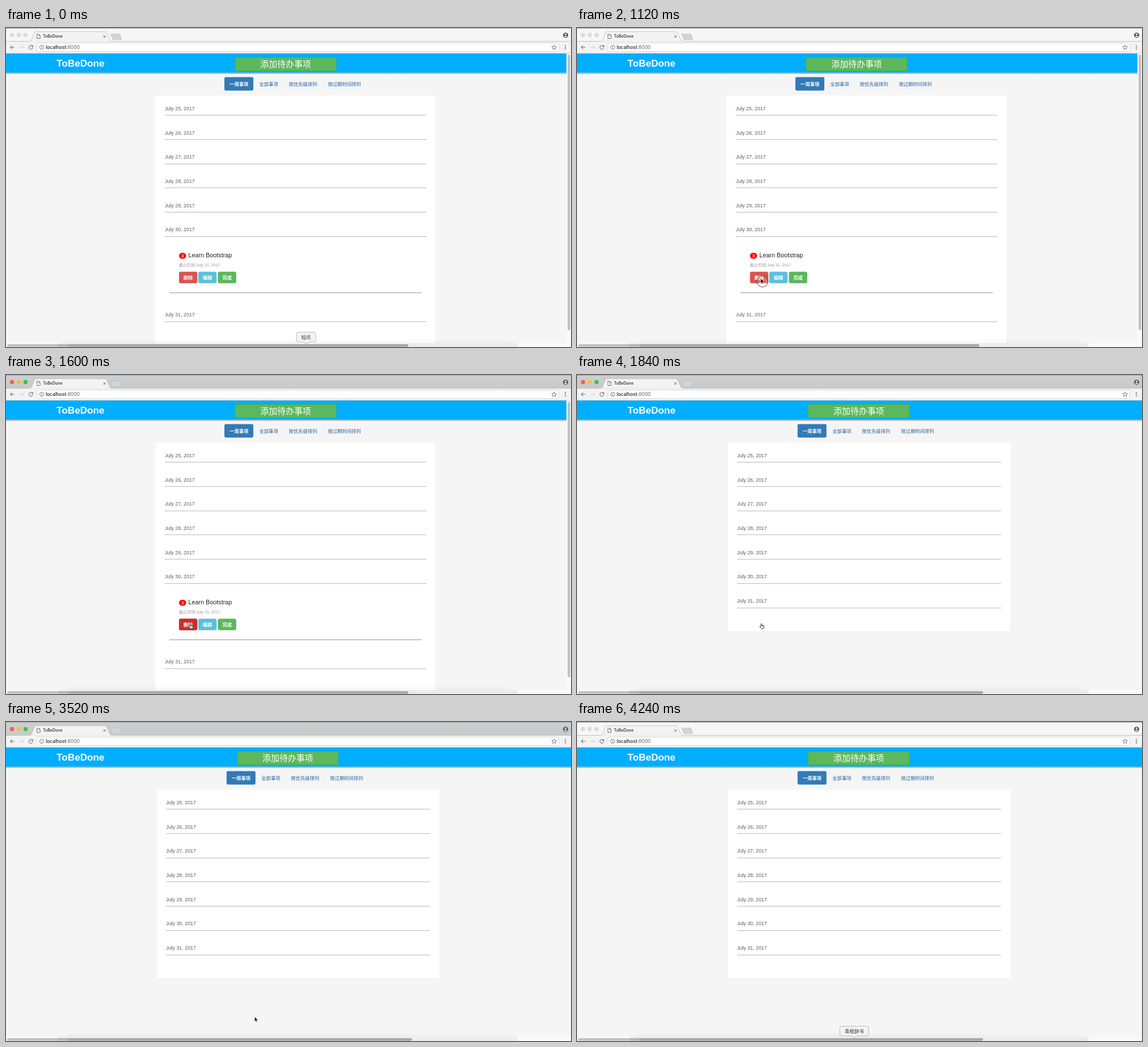
These frames come from a looping animation (996x562 px, 4.32 s). An HTML page:

```html
<!DOCTYPE html>
<html lang="zh-CN">
<head>
<meta charset="utf-8">
<title>ToBeDone</title>
<style>
  html, body { margin: 0; width: 100%; height: 100%; overflow: hidden; background: #f5f5f5; }
  svg { display: block; width: 996px; height: 562px; }
  text { font-family: "Liberation Sans", Arial, "Noto Sans CJK SC", "Noto Sans CJK", sans-serif; font-size: 8.3px; white-space: pre; }
  .ui { font-family: Inter, "Noto Sans", sans-serif; font-weight: 500; }
  .mid { text-anchor: middle; }
  .bold { font-weight: 700; }
  .white { fill: #fff; }
  .link { fill: #23609f; }
  .date { font-size: 8.9px; fill: #5c5c5c; }
  .brand { font-size: 17.2px; font-weight: 700; fill: #fff; }
  .add { font-size: 14.9px; font-weight: 500; fill: #fff; }
  .line { fill: none; stroke: #5a5a5a; stroke-width: 1; }

  .anim { animation: 4320ms step-end infinite; }
  .before { animation-name: before; }
  .after { animation-name: after; }
  .focus { animation-name: focus; }
  .blur { animation-name: blur; }
  .hover { animation-name: hover; }
  .tipA { animation-name: tipA; }
  .tipB { animation-name: tipB; }
  .arrow { animation-name: arrow; }
  .hand { animation-name: hand; }
  .ring { animation-name: ring; }
  .cursor { animation-name: move; }

  @keyframes before { 0% { opacity: 1 } 42.59%, 100% { opacity: 0 } }
  @keyframes after { 0% { opacity: 0 } 42.59%, 100% { opacity: 1 } }
  @keyframes focus { 0% { opacity: 0 } 27.77% { opacity: 1 } 98.14%, 100% { opacity: 0 } }
  @keyframes blur { 0% { opacity: 1 } 27.77% { opacity: 0 } 98.14%, 100% { opacity: 1 } }
  @keyframes hover { 0% { opacity: 0 } 33.33% { opacity: 1 } 42.59%, 100% { opacity: 0 } }
  @keyframes tipA { 0% { opacity: 1 } 3.7%, 100% { opacity: 0 } }
  @keyframes tipB { 0% { opacity: 0 } 87.03%, 100% { opacity: 1 } }
  @keyframes arrow { 0% { opacity: 1 } 31.48% { opacity: 0 } 51.85%, 100% { opacity: 1 } }
  @keyframes hand { 0% { opacity: 0 } 31.48% { opacity: 1 } 51.85%, 100% { opacity: 0 } }
  @keyframes ring {
    0% { opacity: 0 } 25.92% { opacity: 1 } 27.77% { opacity: 0 }
    38.88% { opacity: 1 } 42.59%, 100% { opacity: 0 }
  }
  @keyframes move {
    0% { transform: translate(528px, 575px) }
    3.7% { transform: translate(514px, 534px); animation-timing-function: steps(2) }
    7.4% { transform: translate(450px, 488px); animation-timing-function: steps(2) }
    11.11% { transform: translate(385px, 454px); animation-timing-function: steps(2) }
    14.81% { transform: translate(345px, 440px); animation-timing-function: steps(5) }
    24.07% { transform: translate(324px, 441.5px) }
    29.62% { transform: translate(324px, 441.5px); animation-timing-function: steps(4) }
    37.03% { transform: translate(325px, 438px) }
    50% { transform: translate(325px, 438px); animation-timing-function: steps(5) }
    59.25% { transform: translate(347px, 438px) }
    66.66% { transform: translate(363.5px, 435.5px); animation-timing-function: steps(2) }
    70.37% { transform: translate(372px, 445px) }
    74.07% { transform: translate(372px, 445px); animation-timing-function: steps(7) }
    87.03%, 100% { transform: translate(488px, 575px) }
  }
</style>
</head>
<body>
<svg viewBox="0 0 996 562">
  <defs>
    <linearGradient id="bar" x2="0" y2="1">
      <stop stop-color="#cecfd0"/><stop offset="1" stop-color="#c8c9cb"/>
    </linearGradient>
    <linearGradient id="shade" x2="0" y2="1">
      <stop stop-color="#777" stop-opacity=".8"/><stop offset="1" stop-color="#888" stop-opacity="0"/>
    </linearGradient>
  </defs>

  <g id="pages"></g>

  <!-- browser chrome -->
  <rect width="996" height="24" fill="#f6f6f6"/>
  <g class="anim focus"><rect width="996" height="24" fill="url(#bar)"/></g>
  <rect width="996" height="1" fill="#a0a0a0"/>
  <rect y="23" width="996" height="1" fill="#c2c2c2"/>
  <rect y="24" width="996" height="21" fill="#f3f3f3"/>
  <rect y="44" width="996" height="1" fill="#d4d0cd"/>
  <path d="M41 24Q44 23.500 45 21L50 9Q51 6.500 53 6.500H174Q176.500 6.500 177.500 9L183 21Q184 23.500 187 24Z" fill="#f3f3f3" stroke="#b5b5b5" stroke-width=".7"/>
  <rect x="41" y="23.600" width="146" height="1.500" fill="#f3f3f3"/>
  <path d="M185.500 10.500H199Q200.500 10.500 201 11.500L204 19.500Q204 20.500 203 20.500H190Q188.500 20.500 188 19.500L184.800 11.500Q184.600 10.500 185.500 10.500Z" fill="#d4d4d4" stroke="#b8b8b8" stroke-width=".6"/>
  <g class="anim blur" fill="#dedede" stroke="#cfcfcf" stroke-width=".6">
    <circle cx="10.500" cy="12.500" r="3.500"/><circle cx="22.500" cy="12.500" r="3.500"/><circle cx="34.500" cy="12.500" r="3.500"/>
  </g>
  <g class="anim focus">
    <circle cx="10.500" cy="12.500" r="3.700" fill="#fc5b55"/><circle cx="22.500" cy="12.500" r="3.700" fill="#fcbc3e"/><circle cx="34.500" cy="12.500" r="3.700" fill="#35c649"/>
  </g>
  <path d="M54.500 11H58L60.200 13.300V18.500H54.500ZM58 11V13.300H60.200" class="line" style="stroke-width:.8"/>
  <text x="65" y="17.300" class="ui" style="font-size:7px" fill="#222">ToBeDone</text>
  <path d="M171.700 13.200l3.800 3.800m0-3.800l-3.800 3.800" class="line"/>
  <circle cx="986.500" cy="12.800" r="4.600" fill="#5c5c5c"/>
  <circle cx="986.500" cy="11.300" r="1.500" fill="#eee"/>
  <path d="M983.600 15.300Q986.500 12.300 989.400 15.300Q986.500 17.400 983.600 15.300Z" fill="#eee"/>
  <path d="M14.500 34H7.500M10.800 30.700L7.500 34L10.800 37.300" class="line"/>
  <path d="M24 34H31M27.700 30.700L31 34L27.700 37.300" class="line" style="stroke:#d0d0d0"/>
  <path d="M46.500 32A3.400 3.400 0 1 0 47.200 34.500" class="line"/>
  <path d="M47.700 30V33.300H44.400Z" fill="#5a5a5a"/>
  <rect x="54.500" y="26.500" width="920" height="15" rx="2" fill="#fff" stroke="#d0d0d0" stroke-width=".8"/>
  <circle cx="63" cy="34" r="3.600" class="line" style="stroke-width:.8"/>
  <path d="M63 33.400V36M63 31.800V32.600" class="line" style="stroke-width:.9"/>
  <text x="70" y="37" class="ui" fill="#222">localhost<tspan fill="#777">:8000</tspan></text>
  <path d="M966.300 29.800l1.200 2.900 3.100.2-2.400 2 .8 3-2.700-1.700-2.700 1.700.8-3-2.400-2 3.100-.2Z" class="line" style="stroke-width:.8"/>
  <g fill="#5a5a5a"><circle cx="986" cy="31" r=".9"/><circle cx="986" cy="34" r=".9"/><circle cx="986" cy="37" r=".9"/></g>

  <!-- dock edge -->
  <path d="M104 555Q106 550 112 550H884Q890 550 892 555Z" fill="#000" opacity=".025"/>
  <rect x="92" y="555" width="810" height="7" fill="#000" opacity=".055"/>
  <g id="tips"></g>

  <g class="anim cursor">
    <circle class="anim ring" cx="3" cy="5" r="9.800" fill="#fff" fill-opacity=".18" stroke="#333" stroke-width=".9"/>
    <path class="anim arrow" d="M0 0V8.400L1.900 6.600L3.200 9.600L4.600 9L3.300 6.100H5.900Z" fill="#000" stroke="#fff" stroke-width=".6"/>
    <path class="anim hand" d="M-.9 .8Q0 -.5 .9 .8V3.200L4.200 3.800Q5 4.100 4.800 5.200L4.200 8.800H-.2L-3 5.200Q-2.800 4 -.9 5.200ZM.9 3.200V5M2.300 3.500V5M3.600 3.700V5" fill="#fff" stroke="#111" stroke-width=".75"/>
  </g>
</svg>
<script>
const box = (x, y, w, h, fill, rx = 0) =>
  `<rect x="${x}" y="${y}" width="${w}" height="${h}" rx="${rx}" fill="${fill}"/>`;
const label = (x, y, cls, str, size = '') =>
  `<text x="${x}" y="${y}" class="${cls}"${size && ` style="font-size:${size}px"`}>${str}</text>`;
const button = (x, fill, edge, str) =>
  `<rect x="${x + .3}" y="429.800" width="31.600" height="19.400" rx="2.200" fill="${fill}" stroke="${edge}" stroke-width=".6"/>` +
  label(x + 16.1, 442.6, 'mid bold white', str);

function rows(x, w, lastY) {
  let out = '';
  for (let i = 0; i < 7; i++) {
    const y = i < 6 ? 144.9 + i * 42.67 : lastY;
    out += label(x, y, 'date', `July ${25 + i}, 2017`) + box(x, Math.round(y + 8.5), w, 1, '#bababa');
  }
  return out;
}

const todo = `<rect x="305" y="396" width="12.500" height="10.500" rx="5.250" fill="#f00"/>` +
  label(311.2, 403.8, 'mid bold white', '3', 7.1) +
  `<g fill="#222">${label(321.5, 403.8, '', 'Learn Bootstrap', 10.8)}</g>` +
  `<g fill="#999">${label(305, 420.3, '', '截止时间:July 31, 2017', 7.1)}</g>` +
  button(305, '#d9534f', '#d43f3a', '删除') +
  `<g class="anim hover">${button(305, '#c9302c', '#ac2925', '删除')}</g>` +
  button(339, '#5bc0de', '#46b8da', '编辑') +
  button(373.6, '#5cb85c', '#4cae4c', '完成') +
  box(288, 466, 445, 1, '#949494');

function page(cls, { width, shift, cardX, cardW, cardH, lineX, lineW, lastY, thumb, extra }) {
  const nav = [[446.5, '全部事项'], [498.5, '按优先级排列'], [567.5, '按过期时间排列']];
  return `<g class="anim ${cls}">` +
    box(0, 45, 996, 517, '#f5f5f5') +
    box(0, 78.7, width, 3, 'url(#shade)') + box(0, 45, width, 33.7, '#00aeff') +
    label(89, 68, 'brand', 'ToBeDone') +
    box(403.4 + shift, 51.3, 179, 24.5, '#4cae4c') + box(404.4 + shift, 52.3, 177, 22.5, '#5cb85c') +
    label(493 + shift, 69, 'mid add', '添加待办事项') +
    box(385 + shift, 86.5, 51, 23.7, '#337ab7', 2.4) +
    label(410.7 + shift, 101.6, 'mid bold white', '一周事项') +
    nav.map(([x, str]) => label(x + shift, 101.6, 'link', str)).join('') +
    box(cardX, 119, cardW, cardH, '#fff') + rows(lineX, lineW, lastY) + extra +
    box(0, 555, 996, 7, '#fafafa') +
    box(2, 557, thumb, 4.4, '#c1c1c1', 2.2) + box(110, 557, thumb - 108, 4.4, '#b2b2b2', 2.2) +
    '</g>';
}

function tip(cls, x, w, str) {
  const m = x + w / 2, r = x + w;
  return `<g class="anim ${cls}"><path d="M${x + 3} 536H${r - 3}Q${r} 536 ${r} 539V550Q${r} 553 ${r - 3} 553H${m + 4}L${m} 557L${m - 4} 553H${x + 3}Q${x} 553 ${x} 550V539Q${x} 536 ${x + 3} 536Z" fill="#f3f3f3" stroke="#b4b4b4" stroke-width=".9"/>` +
    `<g fill="#333">${label(m, 547.5, 'mid', str, 8.5)}</g></g>`;
}

const scroll = box(988, 45, 8, 510, '#fafafa') + box(990, 47, 4.6, 485.5, '#c1c1c1', 2.3);

document.getElementById('pages').innerHTML =
  page('before', { width: 988, shift: 0, cardX: 263.5, cardW: 493.5, cardH: 436, lineX: 280, lineW: 461,
    lastY: 508.3, thumb: 707, extra: todo + scroll }) +
  page('after', { width: 996, shift: 3.8, cardX: 266, cardW: 498, cardH: 332, lineX: 282.2, lineW: 465.3,
    lastY: 401, thumb: 713.5, extra: '' });
document.getElementById('tips').innerHTML =
  tip('tipA', 512, 34, '短讯') + tip('tipB', 463.3, 51, '青梧辞书');
</script>
</body>
</html>
```
